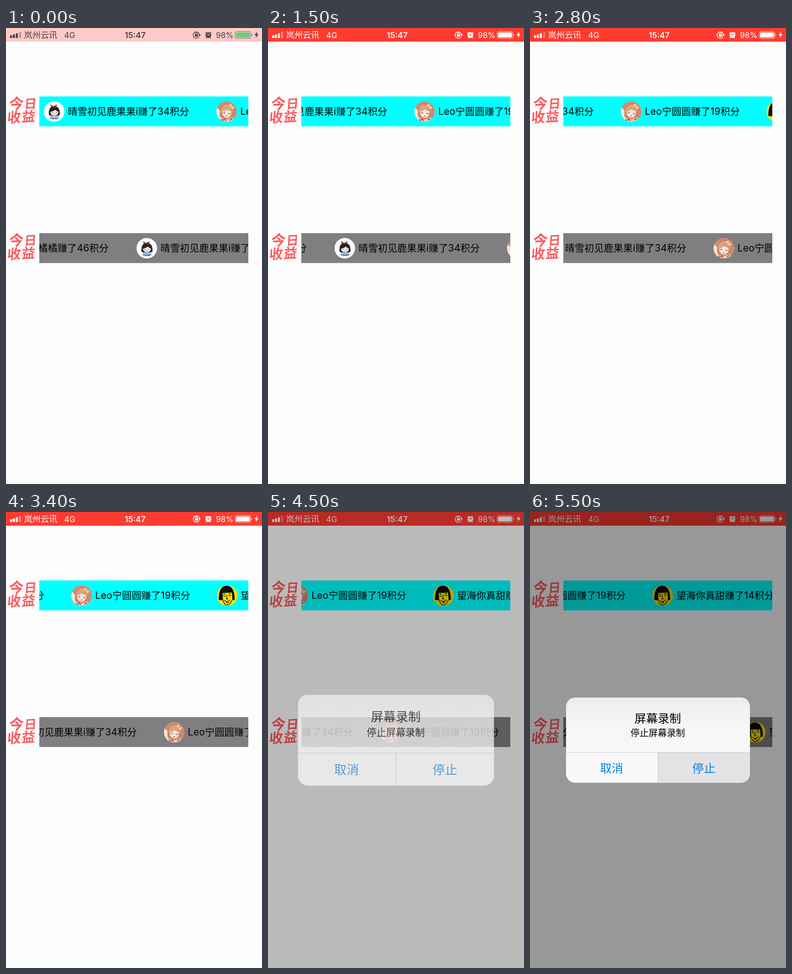
Recreate the animation shown at these times as an HTML page. Size 561 by 998 pixels, loop 5600 ms.

```html
<!DOCTYPE html>
<html lang="zh-CN">
<head>
<meta charset="utf-8">
<title>今日收益</title>
<style>
html, body { margin: 0; width: 100%; height: 100%; overflow: hidden; background: #fefdfe; }
svg { display: block; width: 561px; height: 998px; }
text { font-family: Inter, "Noto Sans CJK SC", "Noto Sans CJK", sans-serif; }
.mid { text-anchor: middle; }
.bold { font-weight: 600; }
.medium { font-weight: 500; }
.item { font-size: 21px; letter-spacing: .25px; }
.badge { fill: #fb5c5e; font-weight: 700; text-anchor: middle; }
#status { fill: var(--ink); font-size: 17.3px; }
#status .line { fill: none; stroke: var(--ink); stroke-width: 1.5; }
.blue { fill: #087ee3; font-size: 25.5px; }
</style>
</head>
<body>
<svg viewBox="0 0 561 998">
  <defs>
    <clipPath id="round"><circle cx="22.5" cy="22.5" r="22.5"/></clipPath>
    <clipPath id="window"><rect x="73" width="458" height="65.8"/></clipPath>
    <clipPath id="panel"><rect x="79" y="406" width="403" height="186.5" rx="20"/></clipPath>
    <linearGradient id="sheen" x2="0" y2="1">
      <stop stop-color="#eeedee"/><stop offset=".4" stop-color="#f8f7f8"/><stop offset="1" stop-color="#f9f9fa"/>
    </linearGradient>

    <g id="doll">
      <circle cx="22.5" cy="22.5" r="22.5" fill="#fff"/>
      <path d="M11 30Q9 11 23 11q13 0 12 19l-4 2H15z" fill="#292427"/>
      <path d="M16 13l-2-6 7 4 8-4-2 6z" fill="#604448"/>
      <ellipse cx="23" cy="25" rx="8.5" ry="6.5" fill="#fde6d8"/>
      <path d="M14 23q1-6 9-6t9 6q-5-2-8-4-4 4-10 4z" fill="#292427"/>
      <path d="M17.500 25h2.500M26 25h2.500M22 28.500h2" stroke="#543" stroke-width="1.2"/>
      <path d="M16 31q7 3 14 0l4 6q-11 3-22 0z" fill="#8fc0ec"/>
      <path d="M14 37q8 2 18 0M19 39h3M25 39h3" fill="none" stroke="#4c5a78" stroke-width="1.3"/>
    </g>
    <g id="girl" clip-path="url(#round)">
      <rect width="45" height="45" fill="#d08d72"/>
      <path d="M0 12L11 24 10 45H0z" fill="#f6e4da"/>
      <path d="M8 34Q5 8 22 4q18 0 19 22l-4 16z" fill="#c98769"/>
      <path d="M13 22q8-8 20 0 1 9-7 14-9 1-13-7z" fill="#fbe3d5"/>
      <path d="M10 25Q10 8 24 7q13 1 13 18l-6-9-3 6-4-7-7 8-2-2z" fill="#dda37f"/>
      <path d="M15 26q2-2 4 0M26 27q3 1 5-1M21 32q2 1 3 0" fill="none" stroke="#8c473e" stroke-width="1.5"/>
      <path d="M7 45l7-8 10 3 11-5 9 10z" fill="#ecd0c3"/>
      <path d="M10 43l8-4 3 4M29 41l6-3" fill="none" stroke="#b3523f" stroke-width="2.5"/>
      <g fill="#f7cf9d"><circle cx="31" cy="9" r="3"/><circle cx="36" cy="14" r="3"/></g>
    </g>
    <g id="bob" clip-path="url(#round)">
      <rect width="45" height="45" fill="#fce500"/>
      <path d="M4 32Q4 1 22 1q17 1 17 31l-6 1H10z" fill="#050505"/>
      <path d="M12 17l21-1 1 15q-3 12-11 13-9-1-11-10z" fill="#fce500"/>
      <g fill="none" stroke="#111" stroke-width="1.4">
        <path d="M12 17q-1 20 8 26 9 1 13-10"/>
        <path d="M14 20l5-1M25 19l6-1M14 23q3 2 5 0M26 22q3 2 5 0M22 21l-1 9 4 0M16 33q7 6 13-1M20 38h6"/>
      </g>
    </g>
    <g id="badge" class="badge">
      <text transform="translate(22 27.5) rotate(-3) skewX(-7)" font-size="32">今</text>
      <text transform="translate(53 25.5) rotate(-3) skewX(-7)" font-size="27">日</text>
      <text transform="translate(17 56.5) rotate(-3) skewX(-7)" font-size="30">收</text>
      <text transform="translate(48.5 54.5) rotate(-3) skewX(-7)" font-size="30">益</text>
    </g>
  </defs>

  <rect width="561" height="998" fill="#fefdfe"/>

  <g id="status">
    <rect width="561" height="29.9" fill="var(--bar)"/>
    <rect x="9" y="16" width="4.5" height="6" rx="1"/>
    <rect x="15" y="14" width="4.5" height="8" rx="1"/>
    <rect x="21.5" y="11.5" width="4.5" height="10.5" rx="1"/>
    <rect x="28.5" y="8.5" width="4.5" height="13.5" rx="1" opacity=".35"/>
    <text x="39.5" y="22.3" font-size="18.2">岚州云讯</text>
    <text x="127.5" y="22">4G</text>
    <text x="283" y="21.5" class="mid bold" font-size="17.5">15:47</text>
    <path class="line" d="M423.5 18.5A7 7 0 1 1 424 14"/>
    <path d="M421 14h6l-3 4z"/>
    <rect x="414" y="14" width="6.5" height="5" rx=".5"/>
    <path class="line" d="M415.3 14v-1.5a2 2 0 0 1 4 0V14"/>
    <circle cx="443.5" cy="15.5" r="6.3"/>
    <path class="line" d="M437 11.5l3-2.500M450 11.500l-3-2.500M439.500 20.500l-1.500 2M447.500 20.500l1.500 2"/>
    <path d="M440.5 13.5l3 2.5 3-3.5" fill="none" stroke="var(--bar)" stroke-width="1.3"/>
    <text x="460" y="22">98%</text>
    <rect class="line" x="502" y="7.7" width="34.5" height="15" rx="3.5" style="stroke-width:1;opacity:.75"/>
    <rect x="504" y="9.7" width="30.5" height="11" rx="2" fill="var(--cell)"/>
    <path d="M538 12.5q2.5 2.5 0 5.5z"/>
    <path d="M550.5 7.5l-6 8.5h4l-1.5 6.5 6.5-9h-4z"/>
  </g>

  <use href="#badge" y="150"/>
  <use href="#badge" y="449"/>
  <g transform="translate(0 149.6)" clip-path="url(#window)">
    <rect width="561" height="66" fill="#0ff"/>
    <g class="track" data-x="83"></g>
  </g>
  <g transform="translate(0 448.8)" clip-path="url(#window)">
    <rect width="561" height="66" fill="#807e80"/>
    <g class="track" data-x="286"></g>
  </g>

  <rect id="dim" width="561" height="998"/>
  <g id="alert">
    <g clip-path="url(#panel)">
      <rect x="79" y="406" width="403" height="187" fill="url(#sheen)"/>
      <rect id="pressed" x="281" y="526" width="201" height="67" fill="#e3e2e4"/>
      <path d="M79 526h403M280.5 526v67" stroke="#c6c5c8"/>
    </g>
    <g id="labels">
      <text class="mid medium" x="280" y="460.5" font-size="25.5">屏幕录制</text>
      <text class="mid" x="280" y="490.5" font-size="19.9">停止屏幕录制</text>
      <text class="mid blue" x="179" y="569.5">取消</text>
      <text class="mid blue medium" x="381" y="569.5">停止</text>
    </g>
  </g>
</svg>
<script>
const LOOP = 5600, STEP = 100, SPEED = 93.5;
const $ = id => document.getElementById(id);
const tracks = [...document.querySelectorAll('.track')];

const items = [
  { x: 0, icon: 'doll', text: '晴雪初见鹿果果i赚了34积分' },
  { x: 378, icon: 'girl', text: 'Leo宁圆圆赚了19积分' },
  { x: 697, icon: 'bob', text: '望海你真甜赚了14积分' }
];
const row = items.map(({ x, icon, text }) =>
  `<use href="#${icon}" x="${x}" y="10.7"/><text class="item" x="${x + 52.5}" y="40.7">${text}</text>`).join('');
const tail = '<text class="item" x="-61" y="40.7" text-anchor="end">橘橘赚了46积分</text>';
for (const track of tracks) track.innerHTML = tail + row;

const mix = (a, b, k) => `rgb(${a.map((v, i) => Math.round(v + (b[i] - v) * k))})`;
const WHITE = [255, 255, 255];

// Critically damped rise from 0 to 1
function spring(t) {
  if (t <= 0) return 0;
  return t > .55 ? 1 : 1 - (1 + 11.5 * t) * Math.exp(-11.5 * t);
}

function draw() {
  const tick = Math.floor(performance.now() % LOOP / STEP);
  const t = tick * STEP / 1000;

  const lit = Math.min(1, .27 + 2.6 * t);
  const root = document.documentElement.style;
  root.setProperty('--bar', mix([254, 253, 254], [255, 59, 48], lit));
  root.setProperty('--ink', mix([0, 0, 0], WHITE, lit));
  root.setProperty('--cell', mix([50, 185, 80], WHITE, lit));

  // The ticker hitches slightly as the dialog opens
  const shift = SPEED * t - (tick >= 43 ? 2.5 : 0);
  for (const track of tracks)
    track.setAttribute('transform', `translate(${track.dataset.x - shift} 0)`);

  const p = spring(t - 4.3);
  $('dim').setAttribute('opacity', .4 * p);
  $('alert').setAttribute('opacity', Math.min(1, 1.12 * p));
  $('labels').setAttribute('opacity', Math.sqrt(p));
  $('alert').setAttribute('transform',
    `translate(280.5 499.5) scale(${1.2 - .2 * p}) translate(-280.5 -499.5)`);
  $('pressed').setAttribute('opacity', tick >= 55 ? 1 : 0);

  requestAnimationFrame(draw);
}
draw();
</script>
</body>
</html>
```
